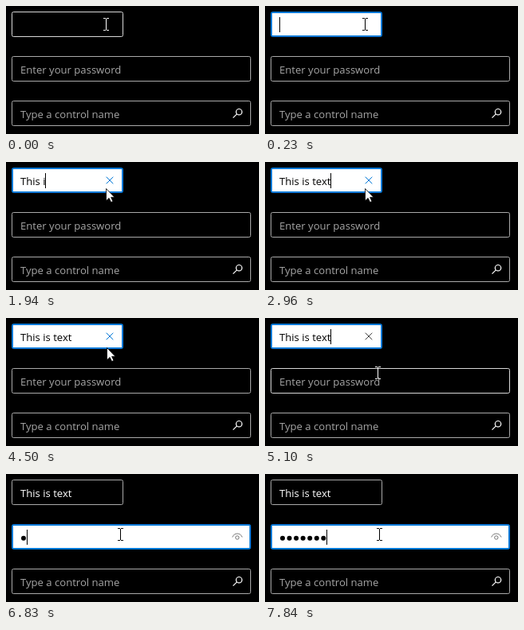
Write an HTML page that moves like this. It is 317 px wide and 161 px high and loops after 7990 ms.

```html
<!DOCTYPE html>
<html lang="en">
<head>
<meta charset="utf-8">
<title>Text input controls</title>
<style>
  html, body { margin: 0; width: 100%; height: 100%; overflow: hidden; background: #000; }
  svg { display: block; width: 317px; height: 161px; }
  text { font: 13.1px "Open Sans", "Noto Sans", sans-serif; fill: #a6a6a6; white-space: pre; }
  .box { fill: #000; stroke: #aaa; }
  .box.hover { stroke: #d8d8d8; }
  .box.focus { fill: #0078d7; stroke: #0078d7; }
  .inner { fill: none; }
  .focus + .inner { fill: #fff; }
  .value { fill: #fff; }
  .focus ~ .value { fill: #000; }
  .focus ~ .hint { fill: #666; }
  .icon { fill: none; stroke: #fff; stroke-width: 1.2; }
  #clear { stroke: #444; stroke-width: 1; }
  #clear.hot { stroke: #0078d7; }
  #reveal { stroke: #777; stroke-width: 1; }
  #beam { fill: none; stroke: #fff; }
  #beam.dark { stroke: #000; }
</style>
</head>
<body>
<svg viewBox="0 0 317 161">
  <g>
    <rect id="nameBox" class="box" x="7.5" y="7.5" width="139" height="31" rx="2"/>
    <rect class="inner" x="9" y="9" width="136" height="28"/>
    <text id="name" class="value" x="18" y="29"></text>
    <path id="clear" class="icon" d="M125.7 18.7l8.6 8.6m0-8.6l-8.6 8.6"/>
  </g>
  <g>
    <rect id="passBox" class="box" x="7.5" y="63.5" width="299" height="31" rx="2"/>
    <rect class="inner" x="9" y="65" width="296" height="28"/>
    <text id="passHint" class="hint" x="18" y="85">Enter your password</text>
    <g id="dots"></g>
    <g id="reveal" class="icon">
      <path d="M283.7 79.5C285.7 73.5 294 73.5 296 79.5"/>
      <circle cx="289.8" cy="80" r="2.2"/>
    </g>
  </g>
  <g>
    <rect class="box" x="7.5" y="119.5" width="299" height="31" rx="2"/>
    <text class="hint" x="18" y="141">Type a control name</text>
    <g class="icon">
      <circle cx="292" cy="133.2" r="3.7"/>
      <path d="M289.3 135.9L284.5 140.7"/>
    </g>
  </g>
  <rect id="caret" width="1" height="19"/>
  <g id="cursor">
    <path id="beam" transform="translate(2.5 1)"
      d="M-3.5 -7.5H-.5M.5 -7.5H3.5M0 -7V7M-3.5 7.5H-.5M.5 7.5H3.5"/>
    <path id="arrow" fill="#fff" stroke="#000" stroke-width=".8"
      d="M.5 .5V15.8L4.1 12.4L6.6 17.6L9 16.5L6.6 11.4H11Z"/>
    <circle id="click" r="12" fill="#fff200" fill-opacity=".6"/>
  </g>
</svg>
<script>
const LOOP = 7990;
const PHRASE = "This is text";
const KEYS = [1150, 1480, 1570, 1660, 1880, 1940, 2090, 2220, 2500, 2680, 2830, 2960];
const PASS_KEYS = [6830, 6970, 7020, 7070, 7330, 7480, 7840];
const DOT_STEP = 8.55;

// Pointer moves: start, end, number of steps, destination
const HOME = [123, 22];
const MOVES = [
  [430, 475, 2, [131, 28]],
  [515, 560, 2, [125, 33]],
  [4350, 5100, 15, [139, 68]],
  [5150, 5610, 8, [141, 75]]
];

const $ = id => document.getElementById(id);
const show = (id, on) => $(id).setAttribute("visibility", on ? "visible" : "hidden");
const within = (t, a, b) => t >= a && t < b;
const typed = (keys, t) => keys.filter(k => k <= t).length;
const ease = p => p * p * (3 - 2 * p);

const dots = PASS_KEYS.map((_, i) => {
  const dot = document.createElementNS("http://www.w3.org/2000/svg", "circle");
  dot.setAttribute("cx", 22 + i * DOT_STEP);
  dot.setAttribute("cy", 80.7);
  dot.setAttribute("r", 3);
  return $("dots").appendChild(dot);
});

function pointer(t) {
  let [x, y] = HOME;
  for (const [start, end, steps, [toX, toY]] of MOVES) {
    if (t < start) break;
    const gap = (end - start) / (steps - 1);
    const p = ease(Math.min(1, (Math.floor((t - start) / gap + 1e-6) + 1) / steps));
    x += (toX - x) * p;
    y += (toY - y) * p;
  }
  return [Math.round(x), Math.round(y)];
}

function render(t) {
  const [x, y] = pointer(t);
  const nameFocus = within(t, 140, 5940);
  const passFocus = t >= 5940;
  const overName = y < 39;
  const overPass = y >= 63;
  const letters = typed(KEYS, t);
  const count = typed(PASS_KEYS, t);
  const overClear = nameFocus && letters > 0 && overName;

  $("nameBox").setAttribute("class", "box" + (nameFocus ? " focus" : overName ? " hover" : ""));
  $("passBox").setAttribute("class", "box" + (passFocus ? " focus" : overPass ? " hover" : ""));

  $("name").textContent = PHRASE.slice(0, letters);
  show("clear", nameFocus && letters > 0);
  $("clear").setAttribute("class", "icon" + (overClear && t >= 1200 ? " hot" : ""));

  show("passHint", count === 0);
  show("reveal", count > 0);
  dots.forEach((dot, i) => dot.setAttribute("visibility", i < count ? "visible" : "hidden"));

  const width = passFocus ? count * DOT_STEP : letters ? $("name").getComputedTextLength() : 0;
  $("caret").setAttribute("x", Math.round(17.6 + width));
  $("caret").setAttribute("y", passFocus ? 70 : 14);
  const blinkOff = within(t, 4400, 4930) || within(t, 5460, 5940);
  show("caret", (nameFocus || passFocus) && !blinkOff);

  const beam = overPass || (overName && !overClear);
  const onWhite = (nameFocus && overName) || (passFocus && overPass);
  show("beam", beam);
  $("beam").setAttribute("class", onWhite ? "dark" : "");
  show("arrow", !beam);
  show("click", within(t, 100, 230) || within(t, 5890, 6120));
  $("cursor").setAttribute("transform", `translate(${x} ${y})`);
}

const begin = performance.now();
function tick() {
  render((performance.now() - begin) % LOOP);
  requestAnimationFrame(tick);
}
tick();
</script>
</body>
</html>
```
